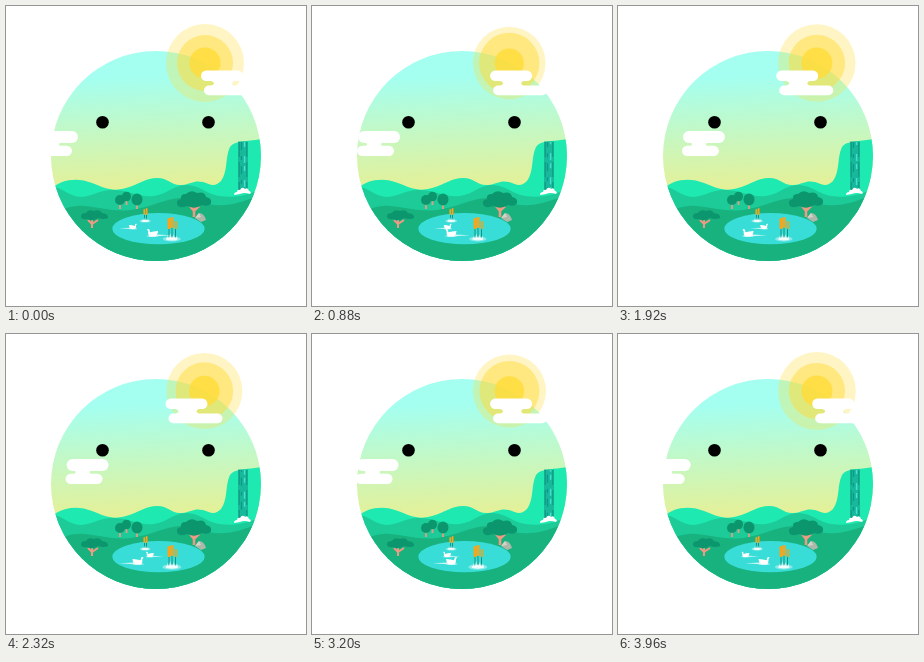
Write an HTML page that moves like this. It is 300 px wide and 300 px high and loops after 4 s.

```html
<!DOCTYPE html>
<html lang="en">
<head>
<meta charset="utf-8">
<title>Pond valley</title>
<style>
  html, body { margin: 0; width: 100%; height: 100%; overflow: hidden; background: #fff; }
  svg { display: block; width: 100vw; height: 100vh; }
</style>
</head>
<body>
<svg viewBox="0 0 300 300">
  <defs>
    <linearGradient id="sky" gradientUnits="userSpaceOnUse" x1="147" y1="45" x2="152" y2="183">
      <stop offset=".18" stop-color="#a4fff0"/>
      <stop offset="1" stop-color="#e6f095"/>
    </linearGradient>
    <clipPath id="disc"><circle cx="150" cy="150" r="105"/></clipPath>
    <g id="duck" fill="#fff">
      <path d="M-5.5-3.3Q-4.5-4.6-3-3.3L-2.5-.8Q1-1.6 5.6-2Q5 3 2.5 3.4H-2.5Q-4.6 3-4.3-2Z"/>
      <path d="M4 1.6L19 2.3L4 3.3Z" opacity=".75"/>
      <ellipse cy="3.1" rx="6" ry=".9" opacity=".6"/>
    </g>
    <g id="splash" fill="#fff">
      <ellipse rx="9" ry="2.6" opacity=".4"/>
      <ellipse rx="6" ry="1.6" opacity=".85"/>
      <path d="M-5 0L-4-4L-3 0L-1.5-6L0 0L2-5L3 0L5-3.5L5.5 0Z" opacity=".6"/>
    </g>
  </defs>

  <g clip-path="url(#disc)">
    <rect x="45" y="45" width="210" height="210" fill="url(#sky)"/>
    <path fill="#1de9b0" d="M45 183C55 173 72 171 86 177C99 182 106 186 120 182C134 178 140 172 151 172C163 172 165 180 176 179C185 178 188 174 197 176C205 179 209 181 215 175C222 166 219 151 224 141C229 134 240 136 255 133V255H45Z"/>
    <path fill="#1ccb98" d="M45 180C57 182 64 191 75 191C88 190 94 183 109 184C126 185 134 192 148 190C161 188 165 181 178 179C193 178 200 188 213 190C229 192 240 190 255 183V255H45Z"/>
    <path fill="#18b27f" d="M45 207C58 204 64 199 78 200C98 202 112 207 130 203C148 200 158 193 174 192C190 191 200 201 218 199C234 198 243 192 255 190V255H45Z"/>
    <g id="fall">
      <rect x="232" y="135.5" width="10" height="50" fill="#18b99a"/>
      <g fill="none" stroke-width="1.4">
        <path d="M233.3 136V184M240.7 136V184" stroke="#139e88" stroke-dasharray="15 5"/>
        <path class="stream" d="M235.5 136V184" stroke="#0e9a88" stroke-dasharray="8 6 4 6"/>
        <path class="stream" d="M238.6 136V184" stroke="#45dfd2" stroke-dasharray="5 9 7 3"/>
      </g>
    </g>
  </g>
  <path fill="#fff" d="M228 189Q228 186 231 186Q231 183 234 184Q236 180 239 183Q242 181 243 185Q246 186 244 188Q238 186 234 188Z"/>

  <ellipse cx="152.5" cy="222.7" rx="46.2" ry="15.6" fill="#39ddd7"/>

  <g stroke="#ef9a82" stroke-width="1.7" fill="none">
    <path d="M114 193V203M120.5 192V199M131 195V203"/>
    <path d="M86 222V214M82 214L86 218L92 214" stroke-width="2"/>
    <path d="M188 211V201M184 200L188 205L193 200" stroke-width="2.5"/>
  </g>
  <g fill="#0b966d">
    <ellipse cx="114" cy="194" rx="5" ry="5"/>
    <ellipse cx="120.5" cy="190.5" rx="4.5" ry="4.8"/>
    <ellipse cx="131" cy="193.5" rx="5.5" ry="6"/>
    <path d="M75 210Q75 207 80 207Q82 203 88 205Q94 203 96 207Q103 208 102 212Q98 214 92 212Q86 216 81 213Q75 214 75 210Z"/>
    <path d="M171 198Q170 194 175 193Q174 188 180 188Q185 183 191 187Q199 185 200 191Q206 192 205 197Q203 201 196 199Q188 204 182 200Q172 203 171 198Z"/>
  </g>
  <path fill="#abb8aa" d="M189 212L193 207Q198 207 200 214L195 216Z"/>
  <path fill="#d3d5c9" d="M189 212L193 207L195 211Z"/>

  <g stroke="#168b78" stroke-width=".9">
    <path d="M138.5 206V215M140.5 205V215M163 221V233M166 220V233M169.5 222V233"/>
  </g>
  <g fill="#f5a61d">
    <rect x="137.4" y="203" width="1.8" height="6" rx=".9"/>
    <rect x="139.7" y="202" width="1.8" height="7" rx=".9"/>
    <rect x="161.5" y="212" width="3" height="11" rx="1.2"/>
    <rect x="164.5" y="211" width="3" height="11" rx="1.2"/>
    <rect x="168.5" y="215" width="3" height="8" rx="1.2" fill="#b9b552"/>
  </g>
  <use id="splashSmall" href="#splash"/>
  <use id="splashBig" href="#splash"/>
  <use id="duckSmall" href="#duck"/>
  <use id="duckBig" href="#duck"/>

  <g id="sun" fill="#ffdc3c">
    <circle cy="57" opacity=".3"/>
    <circle cy="57" opacity=".5"/>
    <circle cy="57" opacity=".85"/>
  </g>
  <g fill="#fff">
    <g id="cloudLeft">
      <rect y="125" width="42" height="12" rx="6"/>
      <rect x="-1" y="139.7" width="37" height="10.3" rx="5.15"/>
      <path d="M7 136H25Q21 138.3 25 140.5H7Q11 138.3 7 136Z"/>
    </g>
    <g id="cloudRight">
      <rect y="64.5" width="42" height="10.5" rx="5.25"/>
      <rect x="3" y="79.5" width="54" height="9.8" rx="4.9"/>
      <path d="M9 74.5H34Q28 77.3 34 80.2H9Q17 77.3 9 74.5Z"/>
    </g>
  </g>
  <circle cx="96.5" cy="116.3" r="6.3"/>
  <circle cx="202.5" cy="116.3" r="6.3"/>
</svg>
<script>
const LOOP = 4000;
const byId = id => document.getElementById(id);
const mix = (a, b, k) => a + (b - a) * k;
const place = (id, x, y, sx = 1, sy = sx) =>
  byId(id).setAttribute('transform', `translate(${x} ${y}) scale(${sx} ${sy})`);
// Rises linearly to 1 at the peak, then falls back to 0 at the end of the loop.
const sweep = (t, peak) => t < peak ? t / peak : (LOOP - t) / (LOOP - peak);
const rings = [...byId('sun').children];
const ringSizes = [[39, 36], [28, 30.5], [15.5, 14.5]];
const streams = document.querySelectorAll('.stream');

function draw(now) {
  const t = now % LOOP;
  const drift = sweep(t, 2000);
  const pulse = 1 - Math.abs(t % 2000 / 1000 - 1);
  const facing = t < 2000 ? 1 : -1;

  place('cloudLeft', mix(72, 108.4, drift) - 42, 0);
  place('cloudRight', mix(195, 154.8, sweep(t, 2100)), 0);
  place('duckBig', mix(146.5, 129.3, drift), 227, facing, 1);
  place('duckSmall', mix(127, 147, drift), 220.5, -.72 * facing, .72);

  rings.forEach((ring, i) => {
    ring.setAttribute('cx', mix(199, 197, pulse));
    ring.setAttribute('r', mix(...ringSizes[i], pulse));
  });

  const ripple = Math.sin(t * Math.PI / 500);
  place('splashBig', 165.8, 233, 1 + .06 * ripple);
  place('splashSmall', 139.2, 215, .62 - .04 * ripple);
  streams.forEach(s => s.setAttribute('stroke-dashoffset', -t * .024));
}

function tick(now) {
  draw(now);
  requestAnimationFrame(tick);
}
draw(0);
requestAnimationFrame(tick);
</script>
</body>
</html>
```
